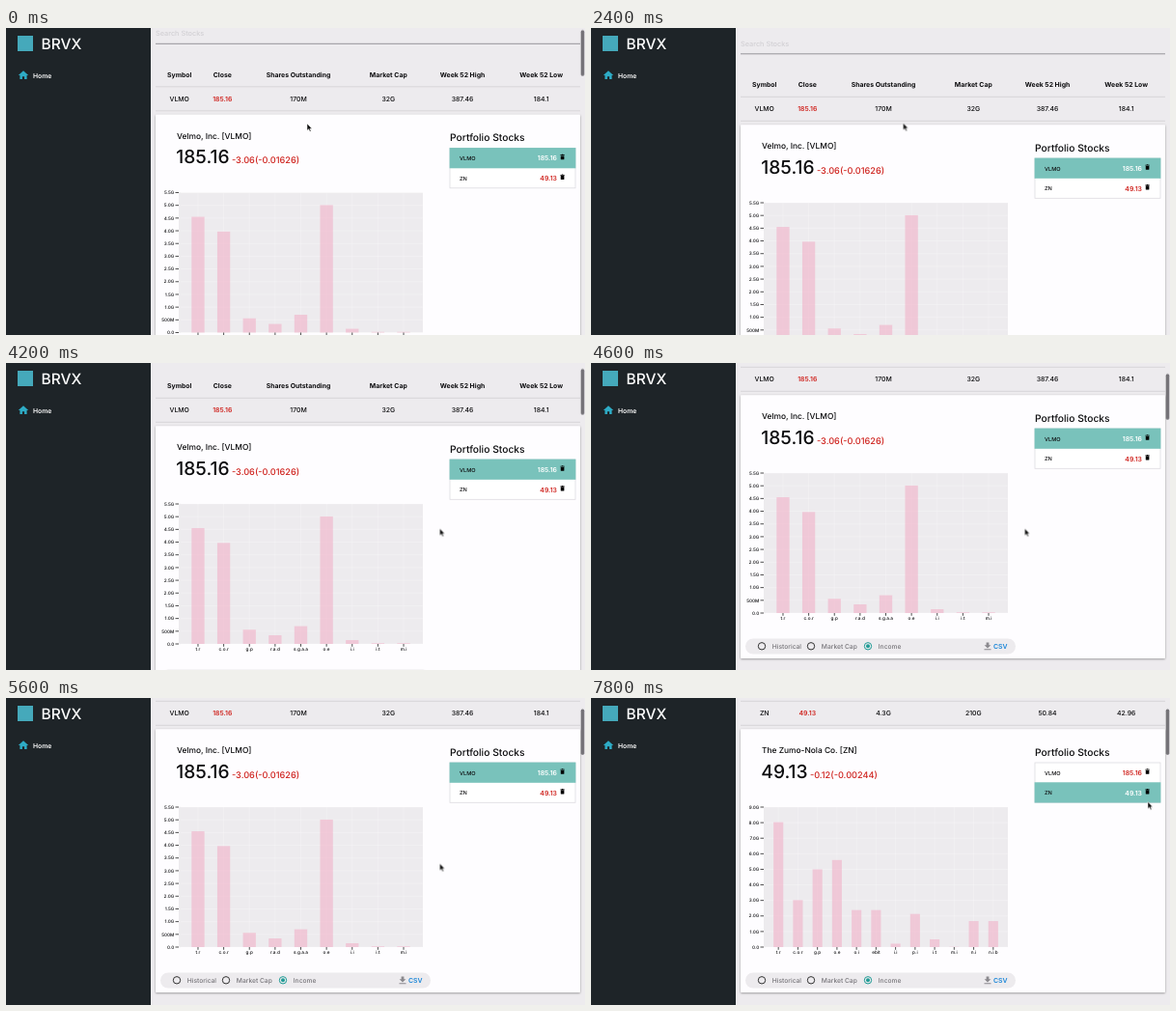
An HTML page for the animation above (8 s loop, 600x318 px).

```html
<!DOCTYPE html>
<html lang="en">
<head>
<meta charset="utf-8">
<title>Stock dashboard</title>
<style>
html, body { margin: 0; width: 100%; height: 100%; overflow: hidden; background: #edebee; }
svg {
  display: block; width: 600px; height: 318px;
  font-family: Inter, Roboto, "Liberation Sans", sans-serif; font-weight: 450;
  text-rendering: geometricPrecision;
  animation: scroll 8s step-end infinite;
}
text { fill: #0c0c0e; }
.page { transform: translateY(calc(var(--y) * -1px)); }
.thumb { transform: translateY(calc(var(--y) * .16px)); animation: fade 8s step-end infinite; }
.cursor { animation: move 8s step-end infinite; }
.first { animation: first 8s step-end infinite; }
.second { animation: second 8s step-end infinite; }

.head { font-size: 6.9px; font-weight: 700; }
.cell { font-size: 6.9px; }
.mid { text-anchor: middle; }
.end { text-anchor: end; }
.name { font-size: 8.4px; }
.price { font-size: 19.2px; }
.change { font-size: 9.2px; font-weight: 500; }
.axis { font-size: 4.7px; font-weight: 500; }
.option { font-size: 6.7px; fill: #77757a; }
.red { fill: #cf231e; }
.bold { font-weight: 600; }
.light { fill: #fff; }
.rule { stroke: #d2d0d4; stroke-width: .8; }
.grid { stroke: #fff; stroke-opacity: .4; stroke-width: .6; }
.bar { fill: #f2b1c9; fill-opacity: .6; }
.tick { stroke: #222; stroke-width: .8; }

/* One step is 200 ms, or 2.5% of the loop. */
@keyframes scroll {
  0% { --y: 10.5; }
  2.5% { --y: 3; }
  5% { --y: 0; }
  47.5% { --y: 5; }
  50% { --y: 18; }
  52.5% { --y: 35; }
  55% { --y: 55; }
  57.5% { --y: 67; }
  62.5%, 100% { --y: 68; }
}
@keyframes fade {
  0% { opacity: 1; }
  17.5% { opacity: 0; }
  47.5%, 100% { opacity: 1; }
}
@keyframes first { 0% { visibility: visible; } 87.5%, 100% { visibility: hidden; } }
@keyframes second { 0% { visibility: hidden; } 87.5%, 100% { visibility: visible; } }
@keyframes move {
  0% { transform: translate(312px, 99px); }
  10% { transform: translate(304px, 82px); }
  12.5% { transform: translate(290px, 54px); }
  15% { transform: translate(280px, 37px); }
  17.5% { transform: translate(272px, 29px); }
  22.5% { transform: translate(276px, 36px); }
  25% { transform: translate(290px, 58px); }
  27.5% { transform: translate(310px, 86px); }
  30% { transform: translate(323.5px, 98.5px); }
  32.5% { transform: translate(395px, 138px); }
  35% { transform: translate(459px, 172px); }
  37.5% { transform: translate(468px, 174px); }
  40% { transform: translate(449.5px, 171.5px); }
  72.5% { transform: translate(460px, 165px); }
  75% { transform: translate(490px, 146px); }
  77.5% { transform: translate(525px, 124px); }
  80% { transform: translate(550px, 108px); }
  82.5% { transform: translate(562px, 100px); }
  85% { transform: translate(564px, 98px); }
  92.5% { transform: translate(570px, 102px); }
  95%, 100% { transform: translate(577px, 107.5px); }
}
</style>
</head>
<body>
<svg viewBox="0 0 600 318">
  <defs>
    <filter id="shadow" x="-5%" y="-5%" width="110%" height="110%">
      <feDropShadow dx="0" dy=".8" stdDeviation="1.1" flood-opacity=".38"/>
    </filter>
    <path id="bin" d="M0 .6h1.3l.3-.5h1.2l.3.5h1.3v.7H0zM.4 1.7h3.6v3.3q0 .6-.6.6H1q-.6 0-.6-.6z"/>
  </defs>
  <rect width="600" height="318" fill="#edebee"/>

  <g class="page">
    <text x="155" y="18.6" font-size="7.3" style="fill:#d2d0d4">Search Stocks</text>
    <path d="M155 26.8H595" stroke="#96949a"/>
    <g id="table"></g>
    <path class="rule" d="M155 71.3H595M155 96.3H595"/>
    <rect x="155" y="100.3" width="440" height="272.7" rx="1" fill="#fefdff" filter="url(#shadow)"/>
    <text x="460" y="127.6" font-size="10.3">Portfolio Stocks</text>
    <g id="stocks"></g>

    <rect x="160" y="352.5" width="280" height="16" rx="8" fill="#edebee"/>
    <g id="options"></g>
    <path d="M409.6 356.4h2.8v2.9h2l-3.4 3.2-3.4-3.2h2zM407.5 363.2h7v1.1h-7z" fill="#8b898e"/>
    <text x="417" y="362.6" font-size="6.9" class="bold" style="fill:#1a86d8">CSV</text>
  </g>

  <rect class="thumb" x="595.7" y=".5" width="3.6" height="47.5" rx="1.8" fill="#757378"/>

  <rect width="150" height="318" fill="#1e2428"/>
  <rect x="12" y="8" width="16" height="16" fill="#45a9bb"/>
  <text class="light" x="36.5" y="21.6" font-size="15.5">BRVX</text>
  <path d="M18 44.3l5.2 4.8h-1.6v4h-2.5v-2.8h-2.2v2.8h-2.5v-4h-1.6z" fill="#2eacc6"/>
  <text class="light" x="28" y="51.5" font-size="6.8" font-weight="600">Home</text>

  <path class="cursor" d="M0 0v7.2l1.7-1.5 1.2 2.6 1.2-.5-1.2-2.6h2.2z" fill="#111" stroke="#fff" stroke-width=".5"/>
</svg>

<script>
const columns = [179.7, 224.3, 303, 396.3, 473, 554.7];
const heads = ["Symbol", "Close", "Shares Outstanding", "Market Cap", "Week 52 High", "Week 52 Low"];
const plot = { x: 179, y: 181, w: 253, h: 145 };

const first = {
  view: "first", name: "Velmo, Inc.", price: "185.16", change: "-3.06(-0.01626)",
  row: ["VLMO", "185.16", "170M", "32G", "387.46", "184.1"],
  max: 5.5, step: .5,
  labels: "t.r c.o.r g.p r.a.d s.g.a.a o.e i.i i.t m.i",
  values: [4.55, 3.97, .56, .34, .7, 5.01, .15, .03, .03]
};
const second = {
  view: "second", name: "The Zumo-Nola Co.", price: "49.13", change: "-0.12(-0.00244)",
  row: ["ZN", "49.13", "4.3G", "210G", "50.84", "42.96"],
  max: 9, step: 1,
  labels: "t.r c.o.r g.p o.e o.i ebit i.i p.i i.t m.i n.i n.i.b",
  values: [8.03, 3.02, 5, 5.6, 2.38, 2.38, .22, 2.13, .5, .02, 1.67, 1.67]
};
const all = [first, second];

const text = (x, y, cls, s) => `<text x="${x}" y="${y}" class="${cls}">${s}</text>`;
const line = (d, cls) => `<path d="${d}" class="${cls}"/>`;
const put = (id, html) => { document.getElementById(id).innerHTML = html; };

function tickName(v) {
  if (!v) return "0.0";
  return v < 1 ? v * 1000 + "M" : v.toFixed(1) + "G";
}

function chart({ max, step, labels, values }) {
  const { x, y, w, h } = plot;
  const base = y + h, band = w / (values.length + .5);
  const names = labels.split(" ");
  let grid = "", bars = "", axes = "";
  for (let v = 0; v <= max; v += step) {
    const ty = base - h * v / max;
    grid += line(`M${x} ${ty}h${w}`, "grid");
    axes += line(`M${x - 3.5} ${ty}h3.5`, "tick") + text(x - 4.7, ty + 1.7, "axis end", tickName(v));
  }
  values.forEach((v, i) => {
    const left = x + band * (i + .5), mid = left + band / 4, tall = h * v / max;
    grid += line(`M${mid} ${y}v${h}`, "grid");
    bars += `<rect x="${left}" y="${base - tall}" width="${band / 2}" height="${tall}" class="bar"/>`;
    axes += line(`M${mid} ${base}v2.8`, "tick") + text(mid, base + 6.7, "axis mid", names[i]);
  });
  return `<rect x="${x}" y="${y}" width="${w}" height="${h}" fill="#edebee"/>` + grid + bars + axes;
}

function list(selected) {
  let out = '<rect x="460" y="135" width="130" height="41.3" fill="#fff" stroke="#dddce0" stroke-width=".8"/>';
  all.forEach((s, i) => {
    const y = 135 + i * 20.7, on = s === selected;
    if (on) out += `<rect x="459.6" y="${y - .4}" width="130.8" height="21.2" fill="#79c2bb"/>`;
    out += `<text x="470" y="${y + 12.5}" font-size="5.6">${s.row[0]}</text>`
      + text(571, y + 12.8, "cell end bold " + (on ? "light" : "red"), s.price)
      + `<use href="#bin" x="574.4" y="${y + 6.2}"/>`;
  });
  return out;
}

function view(s) {
  const cells = s.row.map((c, i) => text(columns[i], 86.4, "cell mid" + (i === 1 ? " red bold" : ""), c));
  return `<g class="${s.view}">` + cells.join("")
    + text(177, 125.3, "name", `${s.name} [${s.row[0]}]`)
    + text(176.3, 150.8, "price", `${s.price}<tspan dx="2.3" class="change red">${s.change}</tspan>`)
    + chart(s) + list(s) + "</g>";
}

put("table", heads.map((h, i) => text(columns[i], 61.2, "head mid", h)).join(""));
put("stocks", all.map(view).join(""));
put("options", [["Historical", 177], ["Market Cap", 228], ["Income", 287]].map(([label, x], i) => {
  const on = i === 2, color = on ? "#219c96" : "#333";
  return `<circle cx="${x}" cy="360.3" r="3.7" fill="none" stroke="${color}"/>`
    + (on ? `<circle cx="${x}" cy="360.3" r="2" fill="${color}"/>` : "")
    + text(x + 10.8, 362.7, "option", label);
}).join(""));
</script>
</body>
</html>
```
